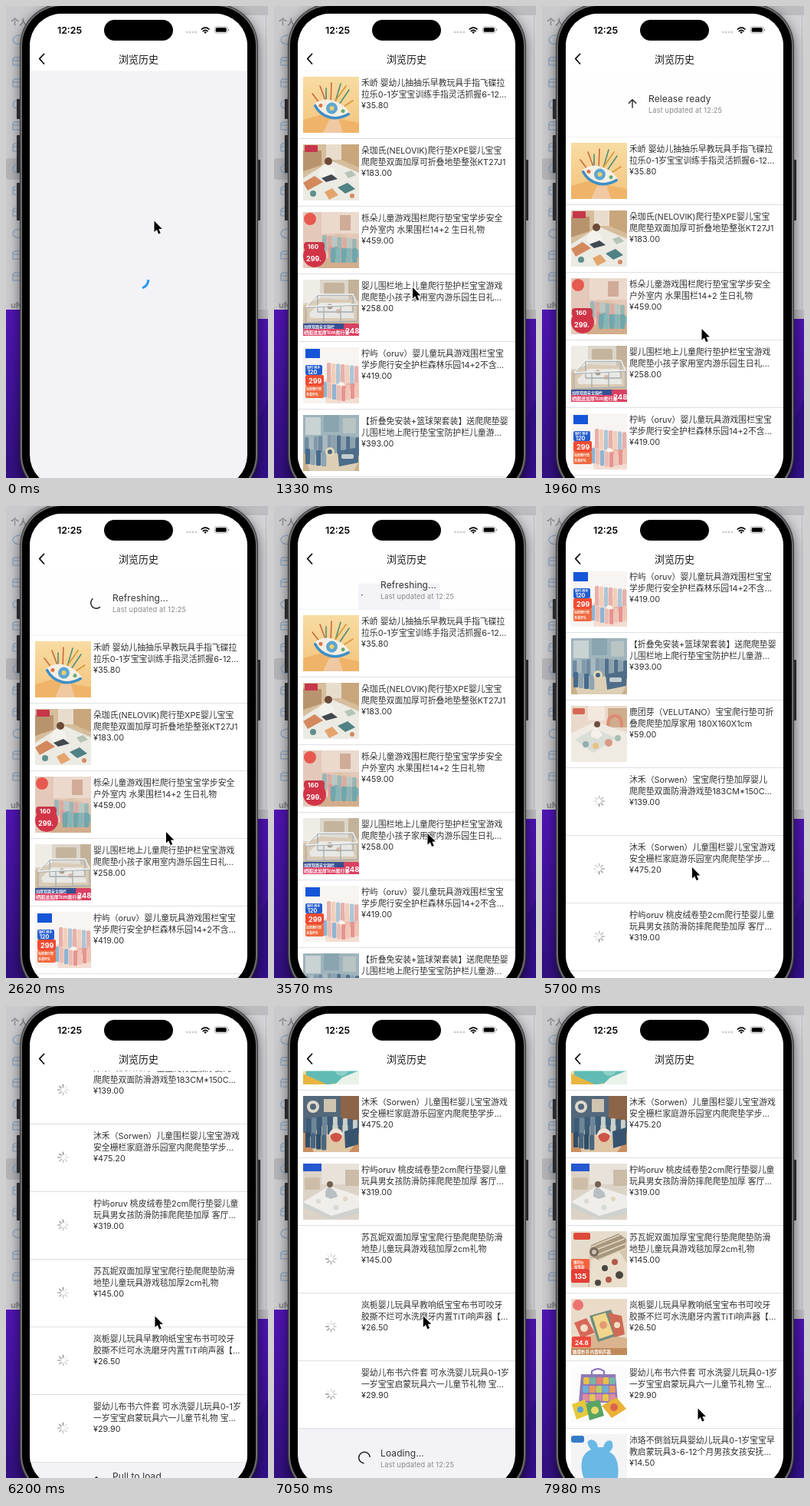
An HTML page for the animation above (8 s loop, 342x614 px).

```html
<!DOCTYPE html>
<html lang="zh-CN">
<head>
<meta charset="utf-8">
<title>浏览历史</title>
<style>
html, body { margin: 0; width: 100%; height: 100%; overflow: hidden; background: #4a12ad; }
svg { display: block; width: 342px; height: 614px; }
text { font-family: Inter, "Noto Sans CJK SC", "Noto Sans CJK", sans-serif; }
.row text { font-size: 10.85px; fill: #303033; }
.head { font-size: 12px; letter-spacing: .1px; fill: #333336; }
.sub { font-size: 9.2px; letter-spacing: .15px; fill: #88888c; }
</style>
</head>
<body>
<script>
const LOOP = 8000, TOP = 84, PITCH = 88, BOTTOM = 626, PAGE = 13;

// Drawing helpers
const R = (x, y, w, h, f, r = 0) => `<rect x="${x}" y="${y}" width="${w}" height="${h}" rx="${r}" fill="${f}"/>`;
const C = (x, y, r, f) => `<circle cx="${x}" cy="${y}" r="${r}" fill="${f}"/>`;
const P = (d, f) => `<path d="${d}" fill="${f}"/>`;
const L = (d, s, w = 1) => `<path d="${d}" fill="none" stroke="${s}" stroke-width="${w}" stroke-linecap="round" stroke-linejoin="round"/>`;
const T = (x, y, s, t, f = '#fff') => `<text x="${x}" y="${y}" style="font-size:${s}px;font-weight:700;fill:${f}">${t}</text>`;
const bars = (x, y, n, step, h, colors, slope = 0) => Array.from({ length: n }, (_, i) =>
  R(x + i * step, y + i * slope, step - .7, h, colors[i % colors.length], 1.5)).join('');

const pictures = [
  R(0, 0, 73, 73, 'url(#warm)') + P('M0 56L22 50 73 60V73H0Z', '#efb469') + P('M26 73L34 56 46 54 52 73Z', '#f0c8a2') +
    L('M31 36L22 12M36 35L37 8M25 39L12 22', '#c9683f', 1.6) + L('M41 36L49 9M45 39L60 17M30 37L30 15', '#4f8f78', 1.6) +
    L('M48 42L65 31M39 36L56 12', '#d9973a', 1.6) +
    `<g transform="rotate(14 37 43)">${P('M13 42Q22 29 38 31T62 42Q52 55 37 54T13 42Z', '#f6efe2')}${L('M15 43Q24 53 37 53T60 43', '#3d8fc6', 3.5)}${C(37, 41, 7.5, '#5aa6d3')}${C(37, 41, 3, '#f3d06a')}${C(22, 41, 2.5, '#e36f41')}${C(52, 41, 2.5, '#69ab72')}</g>`,
  R(0, 0, 73, 73, '#d6bd9c') + P('M0 8H24V27L0 35Z', '#b8946e') + R(30, 0, 20, 20, '#e8ddcd') + P('M50 0H73V30L50 20Z', '#c9a67c') +
    P('M0 44L36 21 73 37V73H0Z', '#ebeae3') + P('M0 50L15 41 26 49 6 60Z', '#d3895d') + P('M45 56L58 50 68 58 55 64Z', '#4f8285') +
    P('M28 62L38 57 46 66 34 72Z', '#e3a56c') + P('M54 37L63 34 69 40 59 44Z', '#b6c4b7') + C(13, 64, 4, '#608f8c') + C(64, 67, 3, '#d28b66') +
    P('M21 41Q20 28 30 25L39 31 42 39 30 44Z', '#f4f2ec') + P('M24 44L37 39 45 45 30 49Z', '#42484f') +
    C(33, 22, 5, '#6b4a38') + R(2, 1, 17, 9, '#c63749', 1),
  R(0, 0, 73, 73, '#e4c9ba') + R(24, 0, 49, 28, '#ecd9cd') + R(48, 4, 14, 20, '#d0ab96') + P('M24 34L48 28 73 38V50L30 54Z', '#dfc3a9') +
    bars(25, 30, 7, 6.5, 21, ['#9bb6b6', '#d8aca5', '#b6c8c6'], .8) + bars(33, 44, 6, 6.7, 20, ['#d99b99', '#7faeb1'], 1) +
    P('M20 60H73V73H20Z', '#d3ad8d') + bars(36, 47, 5, 7, 19, ['#6fa7ad', '#86b5b7']) +
    C(9, 9, 8, '#e65950') + R(1, 39, 27, 11, '#c9394a', 4) + C(15, 57, 15, '#d23447') +
    T(6, 48, 8, '160') + T(4, 64, 9, '299.'),
  R(0, 0, 73, 73, '#dcd5ca') + R(0, 0, 22, 30, '#efece6') + R(27, 4, 27, 15, '#c5b49d', 3) + R(59, 0, 14, 27, '#c3b199') +
    P('M0 34L22 24 73 27V58H0Z', '#d5bd9d') + P('M8 44L22 30H62L67 50H10Z', '#e9e7e0') + C(35, 35, 3.5, '#8c7765') + C(46, 41, 3, '#d8a58b') +
    P('M3 37L19 21H66L71 34V54L4 56Z', '#e3e7e855') +
    L('M4 36V56L71 54V33L65 20H19ZM4 36L71 33M19 20V42H65V20M27 35V55M49 34V55', '#a4adb1', 1.3) +
    L('M4 35L19 19H65L71 32Z', '#f3f4f3', 1.5) + R(0, 57, 56, 7, '#354f91') + R(0, 64, 73, 9, '#df4267') +
    R(53, 57, 20, 16, '#d94162', 2) + T(1, 62.5, 5, '加厚双面安全围栏') + T(1, 71, 6, '晒图送加厚1cm爬行垫') + T(55, 70, 9.5, '248'),
  R(0, 0, 73, 73, '#f7f4f2') + P('M25 45L46 31 73 44V73H30Z', '#f3ddd2') +
    bars(31, 20, 7, 6, 26, ['#e7b0aa', '#f1cfba', '#adc6d8'], .7) + C(50, 49, 4, '#f8f3e9') + C(59, 51, 4, '#e6a8a0') +
    bars(26, 45, 4, 6, 20, ['#8fb4d1', '#eabdb4'], 1.5) + bars(50, 50, 4, 6, 20, ['#e79490', '#f0c5b6'], -1.5) +
    R(3, 2, 19, 12, '#1555d8') + R(3, 23, 22, 13, '#255dce', 2) +
    R(3, 36, 24, 14, '#ef4b32', 2) + R(3, 50, 24, 16, '#f06a40', 2) + T(5, 28, 4, '限时·到手') + T(6, 35, 7, '120') +
    T(7, 47, 9, '299') + T(4, 56, 4, '加厚爬行垫') + T(4, 63, 4, '多重好礼'),
  R(0, 0, 73, 73, '#9fb4bb') + R(3, 3, 20, 23, '#c9d3d4') + R(27, 0, 20, 22, '#8aa4b0') + R(52, 4, 17, 20, '#b9c4c4') + R(0, 50, 73, 23, '#cbb08a') +
    P('M5 62L22 48H62L73 60 66 73H9Z', '#ddcfb6') + bars(2, 29, 6, 6, 22, ['#6f8ba0', '#a9b9bf', '#8199aa'], -.6) +
    bars(38, 26, 6, 6, 24, ['#8da2ae', '#52708c'], .6) + bars(3, 44, 4, 7, 20, ['#456b8d', '#8da5b4'], 1) +
    C(35, 48, 6, '#e4d6b8') + C(35, 48, 3, '#48677f') + P('M45 47L72 42V62L47 67Z', '#4d6d89') + R(50, 51, 16, 6, '#c3cdd0', 2),
  R(0, 0, 73, 73, '#ead8ca') + R(22, 0, 22, 19, '#f3e8de') + R(48, 3, 25, 25, '#cfad8c') + L('M48 26Q48 13 57 13T66 26', '#dd8b74', 4) +
    P('M0 36L31 20 73 35V73H0Z', '#efeae2') + P('M5 44L31 29 58 42 29 61Z', '#d9ded6') + C(49, 48, 5, '#d99a87') + C(19, 50, 4, '#92acb2') +
    C(32, 52, 4, '#e8c283') + C(61, 42, 4, '#a6bfae') + P('M26 40Q26 29 33 27L41 38 35 43Z', '#f5f1ea') + C(34, 24, 4, '#6e503e') + R(2, 3, 16, 8, '#d76854', 2),
  R(0, 0, 73, 73, '#f2df9b') + P('M5 34L42 17 73 36V66L34 73H3Z', '#61bbb5') + C(25, 47, 8, '#f2c34f') +
    C(50, 53, 9, '#8bd0c6') + P('M0 59L31 73H0Z', '#e8b540') + P('M51 64L73 55V73H42Z', '#e9f2e8'),
  R(0, 0, 73, 73, '#53687b') + C(13, 14, 8, '#dfd8cb') + C(13, 14, 4, '#53687b') + R(27, 4, 16, 17, '#cfc4b0') + R(49, 0, 24, 32, '#8c6549') + R(0, 48, 73, 25, '#c98d60') +
    P('M4 54L26 38H62L72 57 60 73H14Z', '#dfc6a5') + bars(4, 29, 5, 7, 24, ['#3b5b78', '#6d8799'], -.7) +
    bars(39, 27, 5, 6.5, 24, ['#c9d0cd', '#3f607c'], 1) + bars(3, 47, 4, 7, 20, ['#2f4d69', '#48677f'], 1.2) +
    C(43, 51, 9, '#efe3d6') + P('M35 52Q43 44 51 52Q49 60 43 60T35 52Z', '#cc5548') + P('M54 46L72 41V63L55 68Z', '#36546f'),
  R(0, 0, 73, 73, '#dcd3c7') + R(24, 0, 49, 27, '#e8e2da') + R(2, 18, 20, 16, '#cdbda8', 3) + R(55, 8, 18, 21, '#cbbca8') +
    P('M0 50L34 29 73 42V64L37 73Z', '#f0eeea') + P('M0 50L37 68 73 57V65L37 73 0 57Z', '#cfd1ce') +
    C(20, 49, 3, '#d9d9d0') + C(43, 57, 3.5, '#d5dbd4') + C(55, 46, 3, '#e3d6c2') + P('M29 43Q28 33 34 30L43 37 45 43 36 46Z', '#b9bfc2') + C(35, 27, 4, '#74604e') + R(0, 0, 24, 10, '#2558ce'),
  R(0, 0, 73, 73, '#e6dccd') + P('M24 21L73 11V73H22Z', '#d5c6ae') + P('M26 37L60 22 73 42V73H24Z', '#e9dfcc') +
    P('M26 18L62 3 72 10 70 22 36 38 26 32Z', '#a6977e') + L('M27 20L63 5M28 26L69 10M31 32L71 16M36 37L70 23', '#e1d5bf', 1.8) +
    C(30, 27, 6, '#746a5c') + C(30, 27, 3, '#cfc1aa') + C(44, 48, 4, '#4a4741') + C(57, 40, 4, '#b5594a') + C(63, 57, 5, '#4a4741') +
    C(49, 63, 4, '#b5594a') + C(35, 67, 4, '#4a4741') + R(3, 2, 22, 9, '#df4938', 2) +
    R(0, 36, 24, 13, '#f4623f', 2) + R(0, 49, 24, 18, '#e43e35', 2) + T(3, 42, 4.5, '限时价') + T(4, 47.5, 4.5, '加厚款') + T(4, 62, 9.5, '135'),
  R(0, 0, 73, 73, '#eadbc8') + P('M0 58L32 45 73 51V73H0Z', '#d9b48f') + P('M24 22L52 14 66 46 35 56Z', '#6f8d80') +
    P('M28 23L45 18 55 46 37 52Z', '#f0d58b') + P('M48 18L66 22 70 46 57 50Z', '#cf6a55') + C(42, 34, 5, '#e39a72') + C(60, 34, 4, '#f2dfc1') +
    P('M4 31L20 25 31 44 13 51Z', '#d76858') + C(17, 38, 5, '#f4dec9') + C(9, 8, 7, '#ec7370') +
    R(1, 49, 25, 14, '#ed4b3f', 2) + T(5, 60, 8, '24.8') + R(0, 64, 73, 9, '#c08a5c') + T(2, 71, 5.4, '触摸布书 内置响声器'),
  R(0, 0, 73, 73, '#fcfbfb') + L('M27 11V6Q35 0 43 6V11', '#8a6dbb', 2) + P('M13 10H58L61 47H10Z', '#9079b8') +
    bars(16, 14, 5, 8.5, 9, ['#e9bf49', '#74b8a4', '#e57f77']) + bars(15, 25, 5, 8.7, 9, ['#6faed6', '#ea9860', '#b9cb62']) + bars(15, 36, 5, 8.7, 9, ['#e28aa2', '#e7c552']) +
    P('M1 49L18 43 24 62 7 69Z', '#e5c83a') + P('M19 48L37 43 43 64 24 70Z', '#5aa563') +
    P('M40 51L59 40 72 55 53 67Z', '#eab136') + C(31, 57, 5, '#ead96c') + C(56, 53, 5, '#db634e') + C(12, 56, 4, '#57a2d5'),
  R(0, 0, 73, 73, '#f4f4f5') + R(0, 2, 17, 9, '#357bc7', 3) + P('M14 48Q11 26 26 20Q17 9 26 7Q34 8 35 17H42Q45 6 53 9Q57 18 50 23Q64 30 61 56Q56 73 36 73Q18 70 14 48Z', '#69b8e5')
];

const items = [
  ['禾峤 婴幼儿抽抽乐早教玩具手指飞碟拉', '拉乐0-1岁宝宝训练手指灵活抓握6-12…', '35.80'],
  ['朵珈氏(NELOVIK)爬行垫XPE婴儿宝宝', '爬爬垫双面加厚可折叠地垫整张KT27J1', '183.00'],
  ['栎朵儿童游戏围栏爬行垫宝宝学步安全', '户外室内 水果围栏14+2 生日礼物', '459.00'],
  ['婴儿围栏地上儿童爬行垫护栏宝宝游戏', '爬爬垫小孩子家用室内游乐园生日礼…', '258.00'],
  ['柠屿（oruv）婴儿童玩具游戏围栏宝宝', '学步爬行安全护栏森林乐园14+2不含…', '419.00'],
  ['【折叠免安装+篮球架套装】送爬爬垫婴', '儿围栏地上爬行垫宝宝防护栏儿童游…', '393.00'],
  ['鹿团芽（VELUTANO）宝宝爬行垫可折', '叠爬爬垫加厚家用 180X160X1cm', '59.00'],
  ['沐禾（Sorwen）宝宝爬行垫加厚婴儿', '爬爬垫双面防滑游戏垫183CM*150C…', '139.00'],
  ['沐禾（Sorwen）儿童围栏婴儿宝宝游戏', '安全栅栏家庭游乐园室内爬爬垫学步…', '475.20'],
  ['柠屿oruv 桃皮绒卷垫2cm爬行垫婴儿童', '玩具男女孩防滑防摔爬爬垫加厚 客厅…', '319.00'],
  ['苏瓦妮双面加厚宝宝爬行垫爬爬垫防滑', '地垫儿童玩具游戏毯加厚2cm礼物', '145.00'],
  ['岚栀婴儿玩具早教响纸宝宝布书可咬牙', '胶撕不烂可水洗磨牙内置TiTi响声器【…', '26.50'],
  ['婴幼儿布书六件套 可水洗婴儿玩具0-1岁', '一岁宝宝启蒙玩具六一儿童节礼物 宝…', '29.90'],
  ['沛珞不倒翁玩具婴幼儿玩具0-1岁宝宝早', '教启蒙玩具3-6-12个月男孩女孩安抚…', '14.50']
];

const spokes = Array.from({ length: 8 }, (_, i) =>
  `<path d="M0-3.4V-6.8" stroke="#85858a" stroke-width="1.5" stroke-linecap="round" opacity="${.18 + i * .1}" transform="rotate(${i * 45})"/>`).join('');

const row = ([a, b, price], i) => `<g class="row" transform="translate(0 ${PITCH * i})">
  ${R(31, 1, 284, PITCH, '#fff')}
  <g class="pic" transform="translate(38 8)" clip-path="url(#square)">${pictures[i]}</g>
  <g transform="translate(74.5 44)"><g class="wait">${spokes}</g></g>
  <text x="114" y="20">${a}</text><text x="114" y="35">${b}</text><text x="114" y="49">¥${price}</text>
  ${R(31, PITCH, 284, 1, '#e0e0e4')}</g>`;

const notice = id => `<g id="${id}">
  <g class="arrow">${L('M0 5.3V-5M-4.6-.6L0-5.2 4.6-.6', '#333336', 1.5)}</g>
  <path class="ring" fill="none" stroke="#222" stroke-width="1.5"/>
  <text class="head" x="21" y="-2"></text><text class="sub" x="21" y="12">Last updated at 12:25</text></g>`;

const sidebar = Array.from({ length: 12 }, (_, i) => {
  const y = 44 + i * 28;
  return L(i % 3 ? `M18 ${y - 5}H11L9 ${y - 3}V${y + 5}H18M9 ${y - 1}H18` : `M18 ${y - 6}Q9 ${y - 5} 9 ${y}T18 ${y + 6}`, '#7f9fc0', 1.1);
}).join('');

document.body.innerHTML = `<svg viewBox="0 0 342 614">
<defs>
  <linearGradient id="warm" x2="0" y2="1"><stop stop-color="#f8dca2"/><stop offset="1" stop-color="#f3c37c"/></linearGradient>
  <linearGradient id="wall" x2="0" y2="1"><stop offset=".64" stop-color="#5015b4"/><stop offset="1" stop-color="#32107f"/></linearGradient>
  <clipPath id="square"><rect width="73" height="73"/></clipPath>
  <clipPath id="screen"><rect x="31" y="10" width="284" height="616" rx="42"/></clipPath>
  <clipPath id="view"><rect x="31" y="${TOP}" width="284" height="560"/></clipPath>
  <filter id="blur" x="-20%" width="140%"><feGaussianBlur stdDeviation="8"/></filter>
</defs>
${R(0, 0, 342, 614, 'url(#wall)')}${P('M329 542Q336 520 342 512V614H329Z', '#32108a')}
${R(0, 0, 200, 395, '#cac9cc')}${R(200, 0, 142, 407, '#bdbcc0')}${R(200, 12, 142, 383, '#d3d2d5')}
${R(339, 12, 1, 383, '#bcbbbf')}${R(0, 198, 30, 28, '#b4b3b7', 4)}${sidebar}
${T(6, 25, 11, '个人', '#87868a')}${T(6, 393, 11, 'uN', '#87868a')}
<g filter="url(#blur)" opacity=".55">${R(18, 2, 311, 645, '#000', 55)}</g>
${R(14, 121, 6, 26, '#29292b', 1)}${R(14, 168, 6, 49, '#29292b', 1)}${R(14, 230, 6, 49, '#29292b', 1)}${R(327, 200, 5, 79, '#29292b', 1)}
${R(18, -3, 311, 642, '#39393b', 55)}${R(19, -2, 309, 640, '#6c6c6f', 54)}${R(21, 0, 305, 636, '#000', 52)}
<g clip-path="url(#screen)">
  ${R(31, 10, 284, 616, '#f2f2f7')}
  <path id="spinner" fill="none" stroke="#2196f3" stroke-width="3"/>
  <g id="content" clip-path="url(#view)">
    <rect id="header" x="31" y="${TOP}" width="284" fill="#fefeff"/>
    <g id="patch">${R(110, 101, 107, 34, '#f3f3f8')}</g>
    ${notice('pull')}${notice('load')}
    <g id="list">${items.map(row).join('')}</g>
  </g>
  ${R(31, 10, 284, 74.5, '#fff')}
  ${L('M49.5 62.5L43.7 68.7 49.5 75', '#111', 1.8)}
  <text x="173" y="73.5" text-anchor="middle" font-size="13" font-weight="500" fill="#161618">浏览历史</text>
  <text x="83" y="35.5" text-anchor="middle" font-size="12.4" font-weight="600">12:25</text>
  ${R(128, 18, 90, 27, '#000', 13.5)}
  ${[236.3, 240.2, 244.1, 248].map(x => C(x, 34, 1.3, '#c5c5c9')).join('')}
  ${L('M255.4 30.2Q260.2 25.9 265 30.2M257.3 32.6Q260.2 30 263.1 32.6', '#000', 1.6)}${P('M258.3 34L260.2 36 262.1 34Q260.2 32.6 258.3 34Z', '#000')}
  <rect x="272.4" y="26.9" width="16.6" height="8.2" rx="2.6" fill="none" stroke="#98989b" stroke-width=".8"/>
  ${R(273.7, 28.2, 14, 5.6, '#000', 1.5)}${R(290, 29.6, 1.2, 2.8, '#98989b', .6)}
</g>
<path id="cursor" d="M0 0V14.6L3.3 11.5 5.6 17 8.2 15.9 5.9 10.5H10.4Z" fill="#000" stroke="#fff" stroke-width="1.8" paint-order="stroke" stroke-linejoin="round"/>
</svg>`;

// Start, end and number of picture changes
const bursts = [[0, 0, 1], [80, 1100, 21], [1130, 1960, 9], [2240, 2240, 1], [2560, 3090, 4], [3570, 4550, 12],
  [4640, 5610, 9], [5700, 6650, 7], [6790, 7780, 7], [7840, 7980, 6]];
const scrollKeys = [[0, 0], [1600, 0], [1960, -86], [2200, -86], [2240, -90], [2560, -84], [2740, -60], [3090, -50], [4640, -50],
  [4860, 0], [5120, 71], [5290, 71], [5610, 330], [5700, 360], [6170, 635], [6440, 635], [6600, 679]];
const cursorKeys = [[0, 193.5, 279.5], [80, 193.5, 279.5], [1100, 182, 360], [1230, 181, 366], [1590, 181, 366], [1650, 190, 320],
  [1960, 208.5, 420], [2240, 209, 424], [2560, 209, 424], [3090, 200.5, 426], [3570, 200.5, 426], [4550, 204, 458],
  [4640, 204, 458], [5120, 193.5, 391], [5290, 193.5, 391], [5610, 190, 330], [5700, 196, 470],
  [6170, 194.5, 403.5], [6440, 194.5, 403.5], [6650, 194, 360], [7780, 197, 520], [7840, 197, 520], [7980, 203.5, 523.5]];

function stepTime(t) {
  const [a, b, n] = bursts.findLast(s => s[0] <= t);
  const d = n > 1 ? (b - a) / (n - 1) : 0;
  return d ? a + d * Math.min(n - 1, Math.floor((t - a) / d + 1e-6)) : a;
}

function at(keys, t) {
  const i = keys.findIndex(k => k[0] > t);
  if (i < 0) return keys.at(-1).slice(1);
  const [a, b] = [keys[i - 1], keys[i]], p = (t - a[0]) / (b[0] - a[0]);
  return a.slice(1).map((v, j) => v + (b[j + 1] - v) * p);
}

function arc(x, y, r, from, sweep) {
  const pt = deg => [x + r * Math.cos(deg * Math.PI / 180), y + r * Math.sin(deg * Math.PI / 180)].map(v => v.toFixed(2)).join(' ');
  return `M${pt(from)}A${r} ${r} 0 ${sweep > 180 ? 1 : 0} 1 ${pt(from + sweep)}`;
}

const $ = id => document.getElementById(id);
const show = (el, on) => el.setAttribute('display', on ? 'inline' : 'none');
const move = (el, x, y) => el.setAttribute('transform', `translate(${x} ${y})`);
const rows = [...document.querySelectorAll('.row')].map((el, i) => ({
  el, pic: el.querySelector('.pic'), wait: el.querySelector('.wait'),
  ready: i < 6 ? 700 + i * 55 : i < 7 ? 4900 : i < PAGE ? 6790 + (i - 7) * 60 : 7600
}));

function setNotice(id, y, label, busy, turn, t) {
  const el = $(id), k = (t - 3570) / 1333;
  move(el, 118, y);
  el.querySelector('.head').textContent = label;
  const arrow = el.querySelector('.arrow'), ring = el.querySelector('.ring');
  show(arrow, !busy);
  show(ring, busy);
  arrow.setAttribute('transform', `rotate(${turn})`);
  ring.setAttribute('d', arc(0, 0, 7.3, 111 + k * 560, 9 + 255 * Math.abs(Math.sin(k * Math.PI))));
}

function draw(time) {
  const t = stepTime(time), [scroll] = at(scrollKeys, t), pulled = Math.max(0, -scroll);
  const loaded = t >= 500, more = t >= 7300;

  $('spinner').setAttribute('d', arc(173, 355, 13, 5 + t * .22, 62 + 200 * Math.sin(Math.min(1, t / 700) * Math.PI / 2)));
  show($('spinner'), !loaded);
  show($('content'), loaded);
  move($('list'), 0, TOP - scroll);
  $('header').setAttribute('height', pulled);
  show($('patch'), t >= 3570 && t < 4640);

  const armed = pulled > 55, busy = t >= 2560 && t < 4640;
  show($('pull'), pulled > 0);
  setNotice('pull', TOP + pulled / 2, t >= 4640 ? 'Succeeded' : busy ? 'Refreshing...' : armed ? 'Release ready' : 'Pull to refresh',
    busy, armed ? 0 : 180, t);

  const end = TOP + PITCH * PAGE - scroll, room = Math.max(50, BOTTOM - end), loading = t >= 6640;
  show($('load'), end < BOTTOM && !more);
  setNotice('load', end + room / 2, loading ? 'Loading...' : room > 60 ? 'Release ready' : 'Pull to load',
    loading, room > 60 ? 180 : 0, t);

  rows.forEach((r, i) => {
    show(r.el, i < PAGE || more);
    show(r.pic, t >= r.ready);
    show(r.wait, t < r.ready);
    r.wait.setAttribute('transform', `rotate(${Math.floor(t / 125) % 8 * 45})`);
  });
  move($('cursor'), ...at(cursorKeys, t));
}

const start = performance.now();
function tick() {
  draw((performance.now() - start) % LOOP);
  requestAnimationFrame(tick);
}
tick();
</script>
</body>
</html>
```
